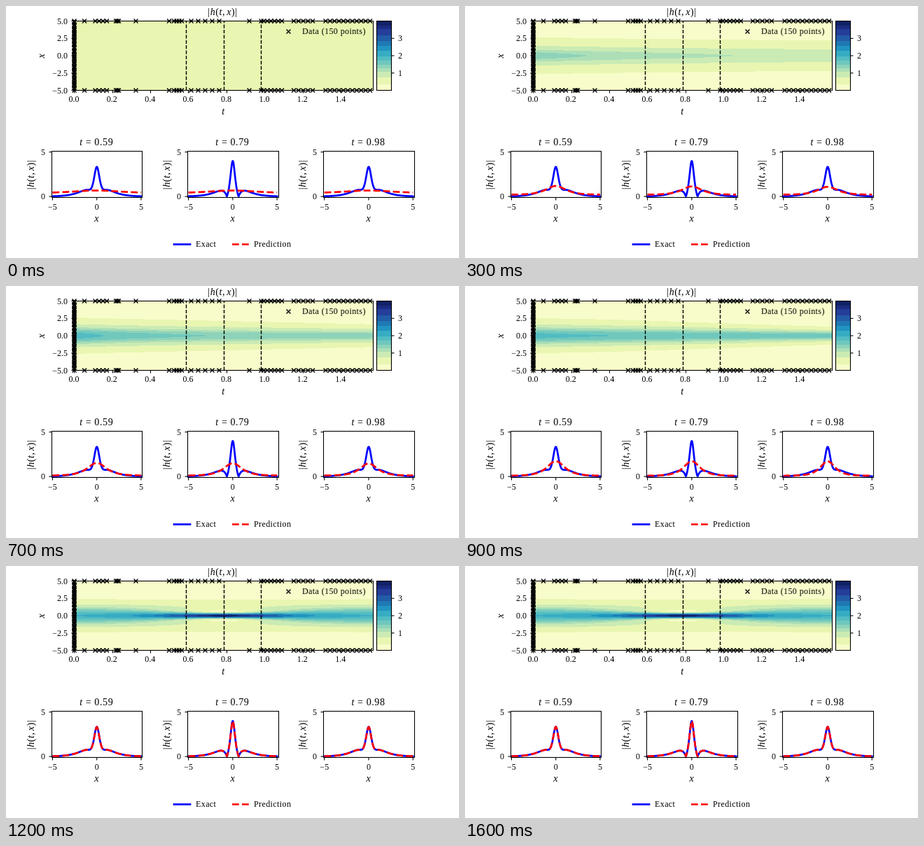
Recreate the animation shown at these times as an HTML page with a canvas. Size 647 by 360 pixels, loop 1.7 s.

```html
<!DOCTYPE html>
<html lang="en">
<head>
<meta charset="utf-8">
<title>Wave field fit</title>
<style>
html, body { margin: 0; width: 100%; height: 100%; overflow: hidden; background: #fff; }
canvas, svg { position: absolute; left: 0; top: 0; display: block; }
text { font-family: "Liberation Serif", serif; font-size: 12px; fill: #000; }
.math { font-size: 14px; letter-spacing: .6px; }
.note { letter-spacing: .4px; }
.it { font-style: italic; }
.axis { fill: none; stroke: #000; stroke-width: 1.1; }
.mark { fill: none; stroke: #000; stroke-width: 1.4; }
.cut { stroke: #000; stroke-width: 1.4; stroke-dasharray: 5.2 2.2; }
.exact, .fit { fill: none; stroke-width: 2.7; }
.exact { stroke: #00f; stroke-linecap: square; stroke-linejoin: round; }
.fit { stroke: #f00; stroke-dasharray: 9.8 4.2; }
</style>
</head>
<body>
<canvas id="field" width="647" height="360"></canvas>
<svg id="plot" width="647" height="360" viewBox="0 0 647 360"></svg>
<script>
const NS = 'http://www.w3.org/2000/svg';
const plot = document.getElementById('plot');
const ctx = document.getElementById('field').getContext('2d');
const { cosh, cos, sin, exp, hypot, min, floor, round, PI } = Math;

const STEP = 100, STEPS = 17, BANDS = 14, TOP = 4;
const MAP = { x: 97, y: 21, w: 427, h: 100 };

// Colour ramp, cut into bands of equal length in colour space
const ramp = '#ffffd9 #edf8b1 #c7e9b4 #7fcdbb #41b6c4 #1d91c0 #225ea8 #253494 #081d58'
  .split(' ').map(h => [1, 3, 5].map(i => parseInt(h.slice(i, i + 2), 16)));
const reach = [0];
for (let i = 1; i < ramp.length; i++)
  reach.push(reach[i - 1] + hypot(...ramp[i].map((v, j) => v - ramp[i - 1][j])));
const bandSize = reach[reach.length - 1] / BANDS;

const colours = Array.from({ length: BANDS }, (_, i) => {
  const d = (i + .5) * bandSize;
  const n = reach.findIndex(r => r > d);
  const f = (d - reach[n - 1]) / (reach[n] - reach[n - 1]);
  return ramp[n - 1].map((v, j) => round(v + (ramp[n][j] - v) * f));
});

function colourOf(value) {
  const p = min(value / TOP, .9999) * (ramp.length - 1), n = floor(p);
  const d = reach[n] + (reach[n + 1] - reach[n]) * (p - n);
  return colours[min(BANDS - 1, floor(d / bandSize))];
}

// Modulus of the two-soliton solution starting from 2 sech x
function exactAt(t, x) {
  const a = cosh(3 * x), b = 3 * cosh(x);
  return 4 * hypot(a + b * cos(4 * t), b * sin(4 * t)) /
    (cosh(4 * x) + 4 * cosh(2 * x) + 3 * cos(4 * t));
}

// A flat guess grows into a ridge, then settles on the exact field
function fitter(step) {
  const s = min(step, 9);
  const base = .05 + .31 * exp(-s / 4);
  const late = .31 + .145 * s;
  const early = .6 * sin(PI * s / 10);
  const width = min(1, .4 + .2 * s);
  const narrow = .35 * (s / 9) ** 3;
  const trust = 1 - exp(-.5 * (step - s) ** 2);
  return (t, x, truth) => {
    const peak = late + early * exp(-.4 * s * t);
    const rough = base + peak / cosh(x * width * (1 + narrow * t * t));
    return rough + (truth - rough) * trust;
  };
}

function add(tag, attrs, text) {
  const el = document.createElementNS(NS, tag);
  for (const key in attrs) el.setAttribute(key, attrs[key]);
  if (text) el.innerHTML = text;
  plot.appendChild(el);
  return el;
}
const path = (d, cls) => add('path', { d, class: cls });
const label = (x, y, text, anchor = 'middle', cls = '') =>
  add('text', { x, y, 'text-anchor': anchor, class: cls }, text);
const upright = (x, y, text) => add('text', {
  transform: `translate(${x} ${y}) rotate(-90)`, 'text-anchor': 'middle', class: 'math'
}, text);
const frame = (x, y, width, height) => add('rect', { x, y, width, height, class: 'axis' });
const cross = (x, y) => path(`M${x - 3} ${y - 3}l6 6m0 -6l-6 6`, 'mark');
const snap = v => round(v) + .5;
const it = s => `<tspan class="it">${s}</tspan>`;
const modulus = `|${it('h')}(${it('t')},<tspan dx="2" class="it">x</tspan>)|`;
const signed = (v, digits) => v.toFixed(digits).replace('-', '\u2212');

const mapX = t => 97.1 + t * 272;
const mapY = x => 71 - x * 9.9;
const cuts = [75, 100, 125].map(n => n * PI / 400);

function buildMap() {
  cuts.forEach(t => path(`M${snap(mapX(t))} 120.5V21.5`, 'cut'));
  frame(97.5, 21.5, 427, 99);
  frame(529.5, 21.5, 21, 99);

  for (let i = 0; i < 8; i++) {
    const x = mapX(i * .2);
    path(`M${snap(x)} 120.5v4`, 'axis');
    label(x - .2, 137, (i * .2).toFixed(1));
  }
  for (let v = -5; v <= 5; v += 2.5) {
    path(`M97.5 ${mapY(v)}h-4`, 'axis');
    label(88, mapY(v) + 4, signed(v, 1), 'end');
  }
  for (let v = 1; v < TOP; v++) {
    const y = 120.5 - v * 24.75;
    path(`M550.5 ${y}h4`, 'axis');
    label(560, y + 4, String(v), 'start');
  }

  // Runs of boundary points: first, last, count
  const runs = [[97.5, 112, 2], [127.5, 144, 4], [157, 161, 3], [185.5, 233, 2], [240, 251, 4],
    [264.5, 304.5, 5], [347.5, 364.5, 2], [368, 394, 6], [411, 438, 5], [456.5, 520, 11]];
  for (const [from, to, count] of runs)
    for (let i = 0; i < count; i++) {
      const x = from + (to - from) * i / (count - 1);
      cross(x, 21.5);
      cross(x, 120.5);
    }
  let seed = 7;
  for (let i = 0; i < 50; i++) {
    seed = (seed * 16807) % 2147483647;
    cross(97.5, 23 + (i + seed / 2147483647) * 1.93);
  }
  cross(403.5, 36.5);
  label(423, 40, 'Data (150 points)', 'start', 'note');
  label(309.5, 13, modulus, 'middle', 'math');
  label(310.5, 155, it('t'), 'middle', 'math');
  upright(55, 71, it('x'));
}

const SCALE = 12.65, UNIT = 12.7, ZERO = 272.1;
function curve(mid, fn) {
  let d = '';
  for (let i = 0; i <= 240; i++) {
    const x = -5 + i / 24;
    d += (i ? 'L' : 'M') + (mid + x * SCALE).toFixed(2) + ' ' + (ZERO - fn(x) * UNIT).toFixed(2);
  }
  return d;
}

function buildSlice(t, i) {
  const shift = i * 194.15, mid = 129.7 + shift;
  const left = snap(65.1 + shift), right = snap(194.4 + shift);
  path(curve(mid, x => exactAt(t, x)), 'exact');
  const fit = path('', 'fit');
  frame(left, 207.5, right - left, 66);
  for (const v of [-5, 0, 5]) {
    const x = mid + v * SCALE;
    path(`M${x} 273.5v4`, 'axis');
    label(x, 291, signed(v, 0));
  }
  for (const v of [0, 5]) {
    const y = ZERO - v * UNIT;
    path(`M${left} ${y}h-4`, 'axis');
    label(left - 9.5, y + 4, String(v), 'end');
  }
  label(mid - .5, 199, `${it('t')} = ${t.toFixed(2)}`, 'middle', 'math');
  label(mid, 308, it('x'), 'middle', 'math');
  upright(mid - 90, 241, modulus);
  return { t, mid, fit };
}

buildMap();
const slices = cuts.map(buildSlice);
path('M240 340.5H263', 'exact');
path('M323 340.5H348', 'fit');
label(271, 344, 'Exact', 'start', 'note');
label(354, 344, 'Prediction', 'start', 'note');

for (let y = 0; y < 99; y++) {
  ctx.fillStyle = `rgb(${colourOf((98.5 - y) / 99 * TOP)})`;
  ctx.fillRect(530, 22 + y, 21, 1);
}

const image = ctx.createImageData(MAP.w, MAP.h);
const colT = i => (MAP.x + i + .5 - mapX(0)) / 272;
const rowX = j => (71 - MAP.y - j - .5) / 9.9;
const truth = new Float32Array(MAP.w * MAP.h);
for (let j = 0, n = 0; j < MAP.h; j++)
  for (let i = 0; i < MAP.w; i++) truth[n++] = exactAt(colT(i), rowX(j));

function draw(step) {
  const fit = fitter(step);
  for (let j = 0, n = 0; j < MAP.h; j++) {
    for (let i = 0; i < MAP.w; i++, n++) {
      image.data.set(colourOf(fit(colT(i), rowX(j), truth[n])), n * 4);
      image.data[n * 4 + 3] = 255;
    }
  }
  ctx.putImageData(image, MAP.x, MAP.y);
  for (const s of slices)
    s.fit.setAttribute('d', curve(s.mid, x => fit(s.t, x, exactAt(s.t, x))));
}

let shown = -1;
function tick() {
  const step = floor(performance.now() / STEP) % STEPS;
  if (step !== shown) draw(shown = step);
  requestAnimationFrame(tick);
}
tick();
</script>
</body>
</html>
```
